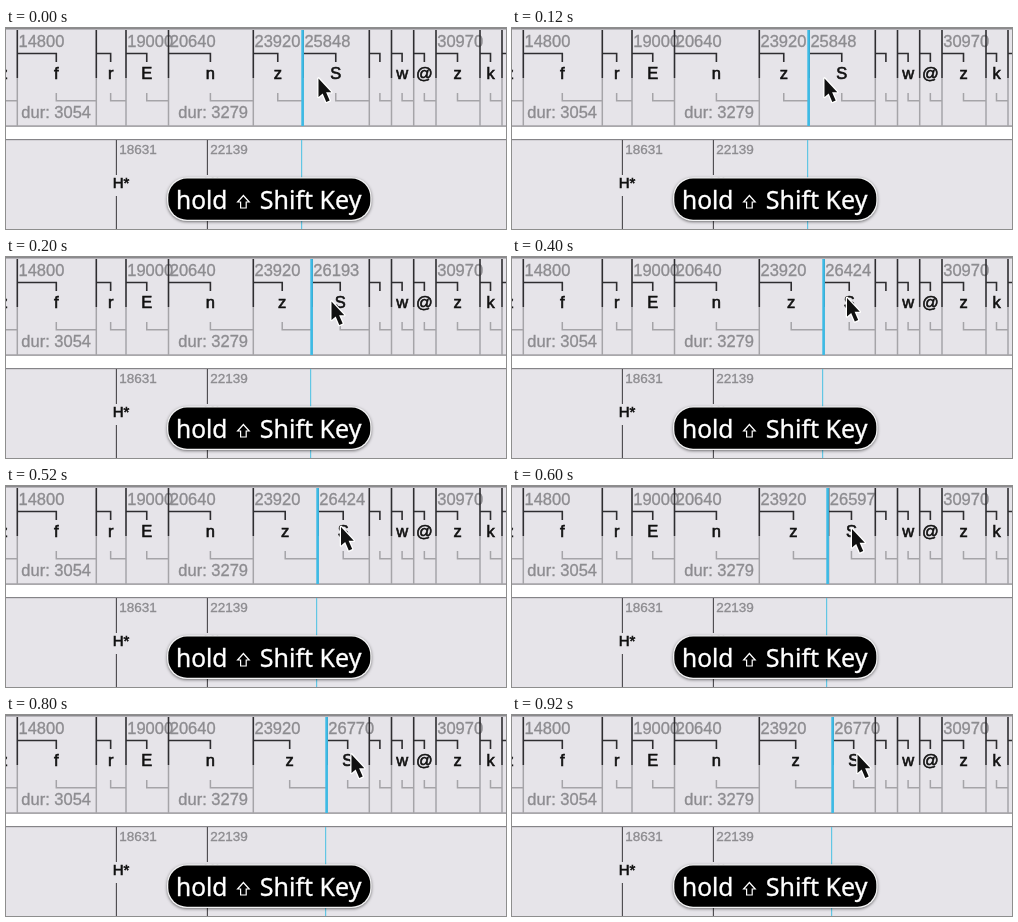
An HTML page with a canvas for the animation above (1000 ms loop, 500 by 201 pixels).

```html
<!DOCTYPE html>
<html lang="en">
<head>
<meta charset="utf-8">
<title>Moving a segment boundary</title>
<style>
  html, body { margin: 0; width: 100%; height: 100%; overflow: hidden; background: #fff; }
  canvas { display: block; }
</style>
</head>
<body>
<canvas id="stage" width="500" height="201"></canvas>
<script>
const ctx = document.getElementById('stage').getContext('2d');
const SANS = '"Liberation Sans", Arial, sans-serif';
const ROUND = '"Noto Sans", "Open Sans", sans-serif';
const PAPER = '#e6e4e9', INK = '#2e2d30', FAINT = '#a5a4a8', GREY = '#8d8c90', BLUE = '#3cbbe6';
const LOOP = 1000, HOLD = 200;

// Sample position of the dragged boundary and pointer tip for every step.
const steps = [
  { sample: 25848, tip: [312.5, 50.5] },
  { sample: 26193, tip: [325.5, 44.5] },
  { sample: 26424, tip: [335, 41] },
  { sample: 26597, tip: [340, 43] },
  { sample: 26770, tip: [345.5, 39.5] }
];
const sampleToX = s => 11.3 + (s - 14800) / 38.64;

function rect(x, y, w, h, color) {
  ctx.fillStyle = color;
  ctx.fillRect(x, y, w, h);
}

function pill(x, y, w, h, r, color) {
  ctx.beginPath();
  ctx.roundRect(x, y, w, h, r);
  ctx.fillStyle = color;
  ctx.fill();
}

function text(str, x, y, size, color, { align = 'left', family = SANS, weight = 0.35 } = {}) {
  ctx.font = `${size}px ${family}`;
  ctx.textAlign = align;
  ctx.fillStyle = ctx.strokeStyle = color;
  ctx.lineWidth = weight;
  ctx.fillText(str, x, y);
  ctx.strokeText(str, x, y);
}

function poly(points, color, width, close) {
  ctx.beginPath();
  points.forEach(([x, y]) => ctx.lineTo(x, y));
  if (close) ctx.closePath();
  ctx.strokeStyle = color;
  ctx.lineWidth = width;
  ctx.stroke();
}

function panels() {
  rect(0, 0, 500, 201, '#fff');
  rect(0, 0, 500, 98, PAPER);
  rect(0, 111, 500, 90, PAPER);
  rect(0, 0, 500, 1.5, '#8b8a8d');
  rect(0, 97.5, 500, 1.2, '#858488');
  rect(0, 111, 500, 1.2, '#858488');
}

function segment({ x, label = '', start, dur }, end) {
  const mid = (x + end) / 2 - 0.5;
  poly([[x, 50], [x, 98]], FAINT, 1.5);
  poly([[mid, 65], [mid, 72.8], [end, 72.8]], FAINT, 1.5);
  poly([[x, 2], [x, 50]], INK, 1.6);
  poly([[x, 25.5], [mid, 25.5], [mid, 34]], INK, 1.6);
  if (start) text(start, x + 1.2, 18.5, 16.5, GREY);
  if (dur) text('dur: ' + dur, end - 5.3, 90, 16.5, GREY, { align: 'right' });
  text(label, mid, 51, 16.5, '#111', { align: 'center', weight: 0.6 });
}

function segmentTier(sample, edge) {
  const segments = [
    { x: -15.3, label: 'z' },
    { x: 11.3, label: 'f', start: 14800, dur: 3054 },
    { x: 90.3, label: 'r' },
    { x: 120, label: 'E', start: 19000 },
    { x: 162.5, label: 'n', start: 20640, dur: 3279 },
    { x: 247.3, label: 'z', start: 23920 },
    { x: edge, label: 'S', start: sample },
    { x: 363.3 },
    { x: 385.5, label: 'w' },
    { x: 407.7, label: '@' },
    { x: 430, label: 'z', start: 30970 },
    { x: 474, label: 'k' },
    { x: 496 }
  ];
  segments.forEach((s, i) => segment(s, i + 1 < segments.length ? segments[i + 1].x : 520));
  rect(Math.floor(edge - 2) + 0.3, 2, 2.6, 96, BLUE);
}

function eventMark(x, label, sample) {
  poly([[x, 112], [x, 147]], '#48464a', 1.1);
  poly([[x, 168], [x, 201]], '#48464a', 1.1);
  text(sample, x + 2.8, 126, 13.5, GREY);
  text(label, x + 4.6, 159.5, 15, '#111', { align: 'center', weight: 0.6 });
}

function eventTier(edge) {
  eventMark(110.4, 'H*', 18631);
  eventMark(201.4, 'H*', 22139);
  rect(Math.floor(edge - 2), 112, 1.2, 89, '#62c6e4');
}

function badge() {
  ctx.save();
  ctx.shadowColor = 'rgba(0, 0, 0, 0.5)';
  ctx.shadowBlur = 3;
  ctx.shadowOffsetY = 1;
  pill(161, 149.2, 204.6, 43.8, 20, '#f2f2f3');
  ctx.restore();
  pill(162.3, 150.5, 202, 41.2, 18.8, '#000');
  text('hold', 170, 180.5, 24.5, '#fff', { family: ROUND });
  text('Shift Key', 253.8, 180.5, 25, '#fff', { family: ROUND });
  poly([[237.4, 167.5], [243.2, 174], [240.2, 174], [240.2, 180],
        [234.6, 180], [234.6, 174], [231.6, 174]], '#fff', 1.2, true);
}

function pointer([x, y]) {
  const shape = [[0, 0], [0, 18.5], [4.2, 15], [7.8, 23.5], [11.2, 22], [7.6, 13.8], [12.8, 13.8]];
  ctx.save();
  ctx.translate(x, y);
  ctx.lineJoin = 'round';
  poly(shape, '#fff', 2.6, true);
  ctx.fillStyle = '#111';
  ctx.fill();
  ctx.restore();
}

function draw(now) {
  const { sample, tip } = steps[Math.floor((now % LOOP) / HOLD)];
  const edge = sampleToX(sample);
  panels();
  segmentTier(sample, edge);
  eventTier(edge);
  badge();
  pointer(tip);
}

const began = performance.now();
function tick() {
  draw(performance.now() - began);
  requestAnimationFrame(tick);
}
tick();
</script>
</body>
</html>
```
